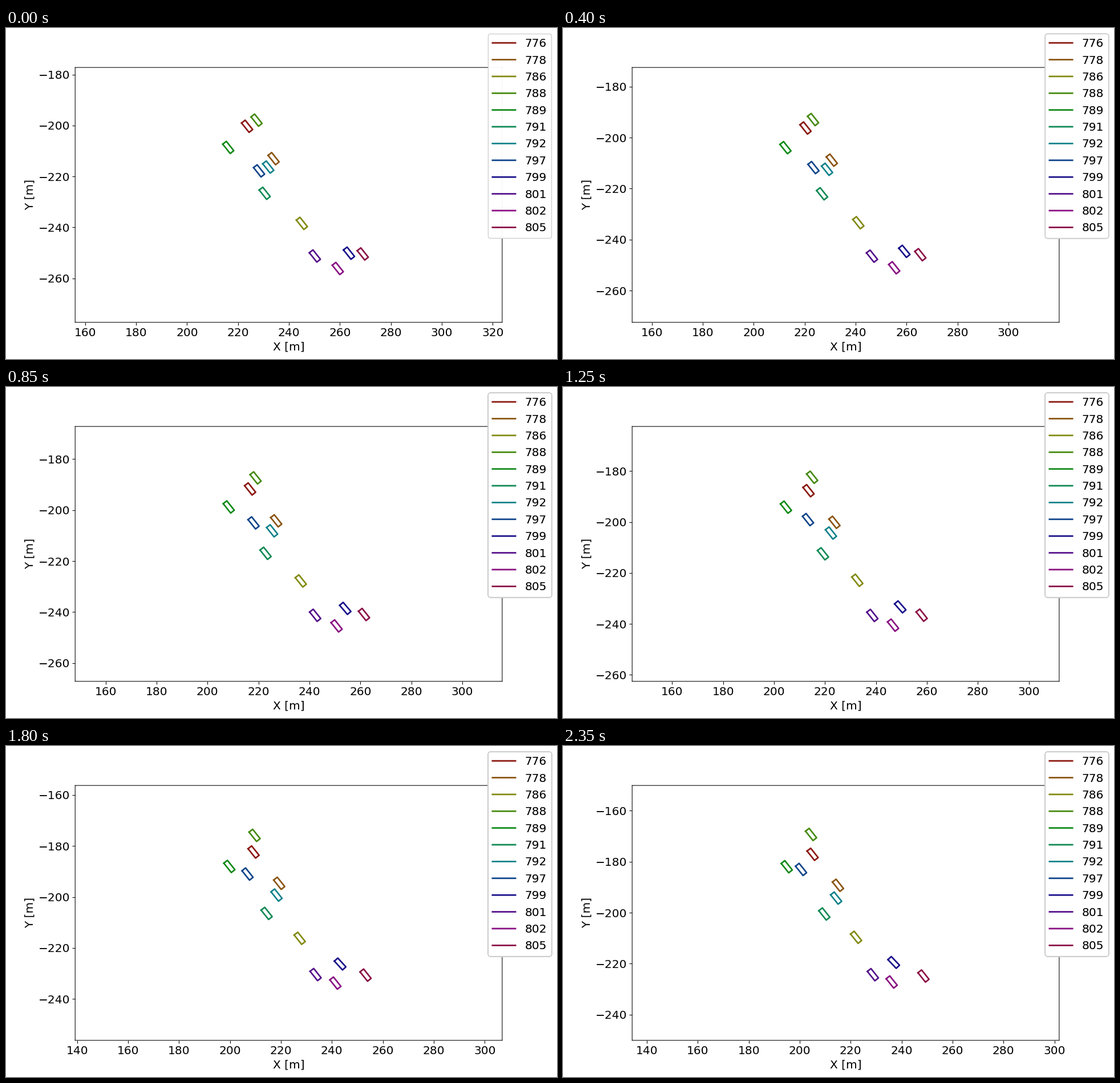
These frames come from a looping animation (966x580 px, 2.4 s). A matplotlib script:

```python
import colorsys

import numpy as np
import matplotlib.pyplot as plt
from matplotlib.animation import FuncAnimation
from matplotlib.patches import FancyBboxPatch
from matplotlib.ticker import MultipleLocator
from matplotlib.transforms import IdentityTransform

W, H, DPI = 966, 580, 96
FRAMES, INTERVAL = 48, 50
AXES = (0.1255, 0.1108, 0.775, 0.77)
HALF_Y = 50.0                                   # metres from centre to edge
HALF_X = HALF_Y * AXES[2] * W / (AXES[3] * H)
CAR_LENGTH, CAR_WIDTH = 4.7, 1.8
HEADING = np.radians(180 - 51.4)                # all cars drive up and left

# id: start x, start y, distance driven in one loop, all in metres
CARS = {
    776: (223.6, -200.3, 29.7),
    778: (234.0, -213.0, 30.4),
    786: (245.1, -238.4, 36.8),
    788: (227.3, -197.9, 36.6),
    789: (216.2, -208.6, 34.1),
    791: (230.5, -226.6, 33.4),
    792: (231.9, -216.3, 28.2),
    797: (228.3, -217.8, 44.5),
    799: (263.6, -250.1, 40.6),
    801: (250.2, -251.2, 34.4),
    802: (259.2, -256.1, 37.0),
    805: (269.0, -250.4, 32.7),
}
TURN = {799: np.radians(5)}                     # one car changes lane

plt.rcParams["font.family"] = "DejaVu Sans"
plt.rcParams["font.size"] = 15.1


def unit(angle):
    return np.array([np.cos(angle), np.sin(angle)])


def pose(car, s):
    """Position and heading of a car at the share s of the loop."""
    x, y, distance = CARS[car]
    turned = TURN.get(car, 0) * s
    driven = distance * s + 1.2 * s * (1 - s)   # slows down slightly
    return (x, y) + driven * unit(HEADING + turned / 2), HEADING + turned


def outline(centre, heading):
    ahead = unit(heading) * CAR_LENGTH / 2
    side = unit(heading + np.pi / 2) * CAR_WIDTH / 2
    corners = [ahead + side, ahead - side, -ahead - side, side - ahead,
               ahead + side]
    return (centre + np.array(corners)).T


fig = plt.figure(figsize=(W / DPI, H / DPI), dpi=DPI)
ax = fig.add_axes(AXES)
ax.set_xlabel("X [m]")
ax.set_ylabel("Y [m]")
ax.xaxis.set_major_locator(MultipleLocator(20))
ax.yaxis.set_major_locator(MultipleLocator(20))
for spine in ax.spines.values():
    spine.set_snap(False)

lines = {}
for k, car in enumerate(CARS):
    color = colorsys.hls_to_rgb(k / len(CARS) + 0.01, 0.3, 0.8)
    lines[car], = ax.plot([], [], color=color, lw=2, label=str(car))

# The legend is laid over itself once more per frame, so its border thickens.
legends = [fig.legend(loc="upper right", labelspacing=0.516)
           for _ in range(2)]
for legend in legends:
    for handle in legend.get_lines():
        handle.set_snap(False)
fig.canvas.draw()
box = legends[0].get_frame()
layers = [
    fig.add_artist(FancyBboxPatch(
        (box.get_x(), box.get_y()), box.get_width(), box.get_height(),
        boxstyle="round,pad=0,rounding_size=0.2",
        mutation_scale=box.get_mutation_scale(),
        fc="white", ec="0.8", lw=1, alpha=0.8, snap=True, zorder=4,
        transform=IdentityTransform()))
    for _ in range(FRAMES - 1)
]


def update(i):
    poses = {car: pose(car, i / (FRAMES - 1)) for car in CARS}
    for car, line in lines.items():
        line.set_data(*outline(*poses[car]))
    # The view follows the mean of all cars.
    cx, cy = np.mean([centre for centre, _ in poses.values()], axis=0)
    ax.set_xlim(cx - HALF_X, cx + HALF_X)
    ax.set_ylim(cy - HALF_Y, cy + HALF_Y)
    for n, layer in enumerate(layers):
        layer.set_visible(n < i)
    return list(lines.values())


anim = FuncAnimation(fig, update, frames=FRAMES, interval=INTERVAL,
                     repeat=True, repeat_delay=0, blit=False)
plt.show()
```
